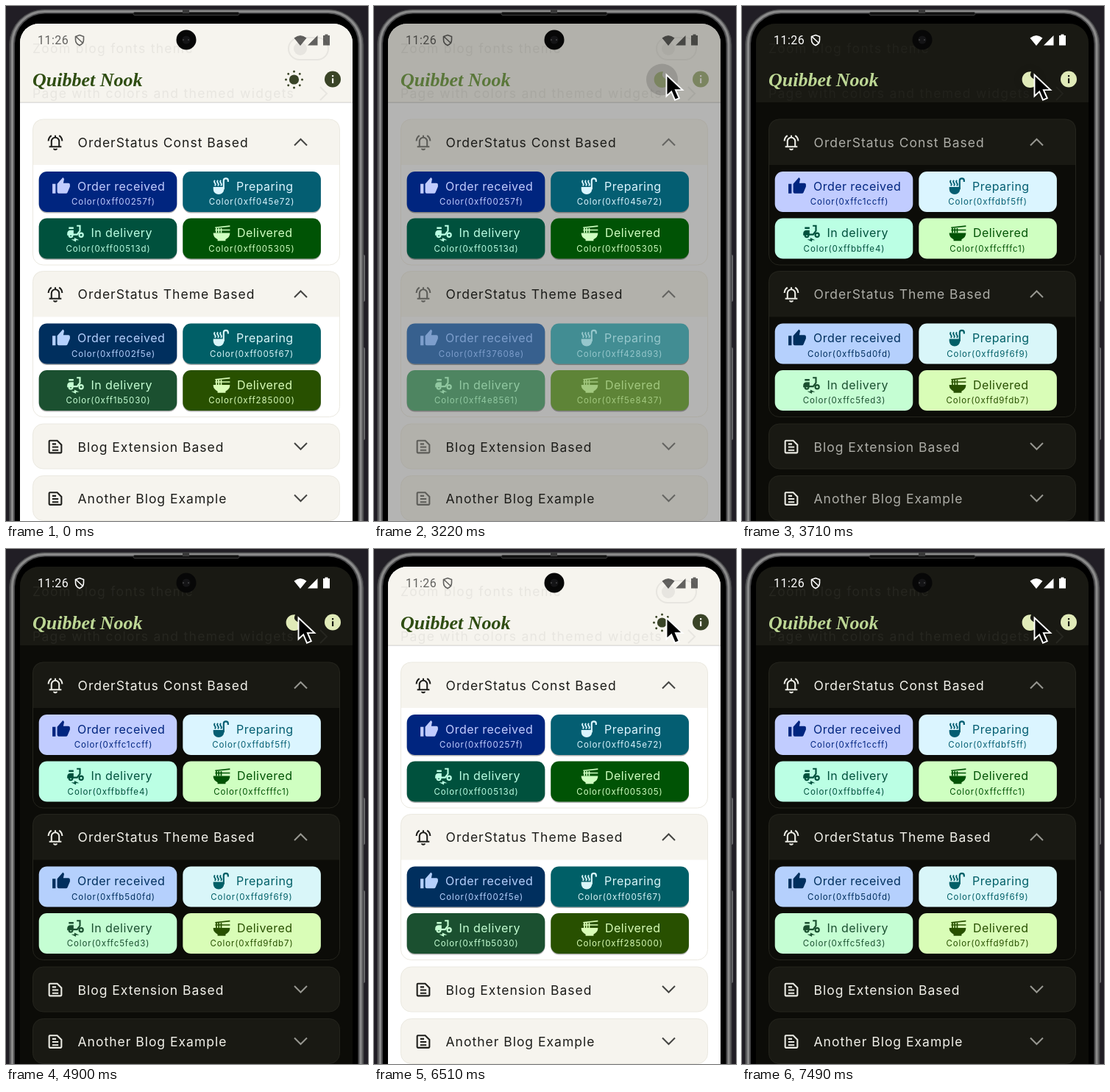
An HTML page that plays this animation: 492 by 700 pixels, repeating every 8000 ms.

```html
<!DOCTYPE html>
<html lang="en">
<head>
<meta charset="utf-8">
<title>Theme switch</title>
<style>
  html, body { margin: 0; width: 100%; height: 100%; overflow: hidden; background: #211e25; }
  svg { display: block; width: 100vw; height: 100vh; }
  text { font-family: Inter, "Open Sans", sans-serif; white-space: pre; }
  .bar { fill: var(--bar); }
  .body { fill: var(--body); }
  .edge { fill: none; stroke: var(--edge); }
  .title { font-size: 17.5px; letter-spacing: 1px; fill: var(--title); }
  .label { font-size: 16px; letter-spacing: .45px; }
  .code { font-size: 11.5px; letter-spacing: .9px; text-anchor: middle; }
  .brand { font: italic bold 26px "Liberation Serif", "Noto Serif", serif; fill: var(--brand); }
  .clock { font: 16px Roboto, sans-serif; letter-spacing: .5px; }
  .status { fill: var(--status); }
  .lead { stroke: var(--lead); }
  .chevron { stroke: var(--chevron); stroke-width: 3; }
  .tool { fill: var(--tool); }
  .line { fill: none; stroke-width: 2; }
  .thin { stroke-width: 1.6; }
  .chip { fill: var(--fg); }
  .chip .line { stroke: var(--fg); }
  .chip .base { fill: var(--bg); }
  .ghost { opacity: .06; }
  .ghost .title { letter-spacing: 1.3px; }
</style>
</head>
<body>
<svg id="stage" viewBox="0 0 492 700" preserveAspectRatio="none"></svg>
<script>
const LOOP = 8000, STEP = 70, FADE = 687;
const TOGGLES = [3010, 4900, 6510];
const stage = document.getElementById('stage');

// light background, dark background; the foreground is the reverse
const CONST = [['00257f', 'c1ccff'], ['045e72', 'dbf5ff'], ['00513d', 'bbffe4'], ['005305', 'cfffc1']];
const THEME = [['002f5e', 'b5d0fd'], ['005f67', 'd9f6f9'], ['1b5030', 'c5fed3'], ['285000', 'd9fdb7']];

const ICONS = {
  thumb: '<path d="M1 21h4V9H1zM7 9v10q0 2 2 2h9q1.4 0 1.9-1.2l3-7q.1-.4.1-.8v-2q0-2-2-2h-6.3l1-5.2L14.2 1z"/>',
  soup: `<path d="M2.5 13H16v2.5a6.5 6.5 0 0 1-13.5 0z"/>
    <path class="line" d="M15.5 16V5a2.8 2.8 0 0 1 5.6 0v1.5"/>
    <path class="line thin" d="M4.5 4.5q-1.6 1.8 0 3.5t0 3.5M8.3 4.5q-1.6 1.8 0 3.5t0 3.5M12 4.5q-1.6 1.8 0 3.5t0 3.5"/>`,
  moped: `<path d="M2 13q0-4.5 4.5-4.5H10V13h4l3-4V4h-3V2h5v7.5L15 15H2zM4 4.5h6v2.5H4zM11 20H7l6 3v-2h4l-6-3z"/>
    <circle class="line" cx="6.5" cy="15" r="2.2"/><circle class="line" cx="19.5" cy="14.5" r="2.4"/>`,
  bowl: `<path d="M1.5 12h21q0 5.5-5.5 8v2H7v-2q-5.5-2.5-5.5-8z"/>
    <path class="line thin" d="M4 5.3 22.5 3.3M4 8.3h18.5M5.5 4.5V12M8.500 4.5V12M11.5 4.5V12"/>`
};
const BELL = 'M7 18v-7a5 5 0 0 1 10 0v7M4 18h16M10.2 20.5a1.8 1.3 0 0 0 3.6 0M12 3v3M3 10.5A9 9 0 0 1 7 3.4M21 10.5A9 9 0 0 0 17 3.4';
const DOC = 'M5 4h9.5L20 9.5V19q0 1-1 1H5q-1 0-1-1V5q0-1 1-1zM8 8.500h5M8 12.5h8M8 16.5h8';

const SLOTS = [
  { icon: 'thumb', text: 'Order received', x: 44.7, y: 0, ix: 62, tx: 97, cx: 146 },
  { icon: 'soup', text: 'Preparing', x: 240.3, y: 0, ix: 279, tx: 313, cx: 334 },
  { icon: 'moped', text: 'In delivery', x: 44.7, y: 63.5, ix: 81, tx: 115.5, cx: 139 },
  { icon: 'bowl', text: 'Delivered', x: 240.3, y: 63.5, ix: 280, tx: 314, cx: 334 }
];

const rect = (x, y, w, h, r, attrs) =>
  `<rect x="${x}" y="${y}" width="${w}" height="${h}" rx="${r}" ${attrs}/>`;
const icon = (x, y, size, inner) =>
  `<g transform="translate(${x} ${y}) scale(${size / 24})">${inner}</g>`;

function chip(s, top) {
  const y = top + s.y;
  return `<g class="chip">
    ${rect(s.x, y + 1.5, 187.6, 55, 11, 'fill="#000" opacity=".3"')}
    ${rect(s.x, y, 187.6, 55, 11, 'class="base"')}
    ${icon(s.ix, y + 7, 26, ICONS[s.icon])}
    <text class="label" x="${s.tx}" y="${y + 25.5}">${s.text}</text>
    <text class="code" x="${s.cx}" y="${y + 45}"></text></g>`;
}

function card(y, name, path, open) {
  const h = open ? 198 : 61;
  const head = open
    ? `<path class="bar" d="M36.5 ${y + 62}v-48q0-14 14-14h389q14 0 14 14v48z"/>`
    : rect(36.5, y, 417, h, 14, 'class="bar"');
  const arrow = open ? `M392 ${y + 35.5}l8.5-8.5 8.5 8.5` : `M392 ${y + 26}l8.5 8.5 8.5-8.5`;
  return `${rect(36.5, y, 417, h, 14, 'class="body"')}${head}
    ${rect(36.5, y, 417, h, 14, 'class="edge"')}
    ${icon(54.5, y + 18.5, 25, `<path class="line lead" d="${path}"/>`)}
    <text class="title" x="97.5" y="${y + 37.5}">${name}</text>
    <path class="line chevron" d="${arrow}"/>
    ${open ? SLOTS.map(s => chip(s, y + 71)).join('') : ''}`;
}

const rays = Array.from({ length: 8 }, (_, i) =>
  `<circle cx="391.5" cy="89" r="1.5" transform="rotate(${i * 45} 391.5 100)"/>`).join('');

const phone = `
  ${rect(0, 0, 492, 700, 0, 'fill="#211e25"')}
  ${rect(482, 338, 6, 64, 2, 'fill="#747476"')}${rect(482, 464, 6, 126, 2, 'fill="#747476"')}
  ${rect(4.5, 4.5, 481.5, 800, 48, 'fill="#5c5c5e" stroke="#38383a"')}
  ${rect(8.5, 7.5, 473.5, 800, 44, 'fill="#4a4a4c" stroke="#8a8a8a" stroke-width="3"')}
  ${rect(12, 10.5, 466.5, 800, 41, 'fill="#000"')}
  ${rect(173, 8.5, 144, 4, 2, 'fill="#111" stroke="#3c3c3c"')}
  ${rect(240, 5, 9, 5, 0, 'fill="#3a3a3a"')}`;

const status = `<g class="status">
  <text class="clock" x="43" y="52">11:26</text>
  <path d="M391.5 43.5q8.5-7 17 0L400 54zM423.5 40v13.5H410z"/>
  <path d="M433.5 40v-1.5h4V40h2.5v13.5h-9V40z"/></g>
  <path class="line thin" stroke="var(--status)" d="M100 39.500l5.5 2v4.5q0 5-5.5 7.5-5.5-2.5-5.5-7.5v-4.5zM95 41.5l10 9.5"/>`;

const bar = `
  ${rect(19, 24, 452, 107, 0, 'class="bar"')}
  ${rect(19, 130.5, 452, 1.5, 0, 'fill="#000" opacity=".12"')}
  <g class="ghost">
    <text class="title" x="36" y="64">Zoom blog fonts theme</text>
    <text class="title" x="36" y="125">Page with colors and themed widgets</text>
    <g id="pill">
      ${rect(384, 43, 54, 30, 15, 'fill="none" stroke="#000" stroke-width="2"')}
      <circle cx="400" cy="58" r="9"/>
    </g>
    <path class="line" stroke="var(--title)" d="M427 110l9 9-9 9"/>
  </g>
  ${status}
  <circle cx="245" cy="46" r="13.5" fill="#070707"/>
  <circle cx="245" cy="46" r="5.5" fill="#141416"/>
  <circle cx="241" cy="46" r="1" fill="#444"/><circle cx="248" cy="46" r="1" fill="#444"/>
  <text class="brand" x="36" y="108.5">Quibbet Nook</text>
  <circle id="ripple" cx="391.5" cy="100" r="21.5"/>
  <g id="sun" class="tool"><circle cx="391.5" cy="100" r="6.6"/>${rays}</g>
  <g id="moon" class="tool">${icon(377, 85.5, 29, '<path d="M12 3a9 9 0 1 0 9 9q0-.7-.1-1.4A5.4 5.4 0 0 1 13.4 3.1Q12.7 3 12 3z"/>')}</g>
  <circle class="tool" cx="444" cy="99.5" r="11"/>
  <path class="bar" d="M443 94h2.2v2.3H443zM443 98.3h2.2v6.7H443z"/>`;

stage.innerHTML = `<defs><clipPath id="screen">${rect(19, 24, 452, 720, 26, '')}</clipPath></defs>
  ${phone}
  <g clip-path="url(#screen)">
    ${rect(19, 24, 452, 676, 0, 'class="body"')}
    ${card(154, 'OrderStatus Const Based', BELL, true)}
    ${card(360.5, 'OrderStatus Theme Based', BELL, true)}
    ${card(568, 'Blog Extension Based', DOC, false)}
    ${card(638.5, 'Another Blog Example', DOC, false)}
    ${bar}
  </g>
  <path id="cursor" d="M0 0v29l6.7-6.2 4.8 11.4 5.8-2.4-4.9-11.200h9.4z" fill="#000" stroke="#fff" stroke-width="1.9"/>`;

const [sun, moon, pill, ripple, cursor] =
  ['sun', 'moon', 'pill', 'ripple', 'cursor'].map(id => document.getElementById(id));
const chips = [...stage.querySelectorAll('.chip')].map((el, i) => ({
  el, code: el.querySelector('.code'), pair: [...CONST, ...THEME][i], fixed: i < 4
}));

const clamp = v => Math.max(0, Math.min(1, v));
function mix(a, b, p) {
  let out = '';
  for (let i = 0; i < 6; i += 2) {
    const u = parseInt(a.slice(i, i + 2), 16), v = parseInt(b.slice(i, i + 2), 16);
    out += Math.floor(u + (v - u) * p).toString(16).padStart(2, '0');
  }
  return out;
}
const show = (el, on) => el.setAttribute('visibility', on ? 'visible' : 'hidden');

function draw(t) {
  const count = TOGGLES.filter(x => x <= t).length;
  const toDark = count % 2 === 1;
  const age = count ? t - TOGGLES[count - 1] : LOOP;
  const level = (delay, length) => {
    const x = clamp((age - delay) / length);
    return toDark ? x : 1 - x;
  };
  const p = level(0, FADE), quick = level(0, 532), late = level(380, 470);

  const set = (name, a, b, k) => stage.style.setProperty('--' + name, '#' + mix(a, b, k));
  set('bar', 'f6f4ee', '191913', p);
  set('body', 'ffffff', '0c0c08', p);
  set('edge', 'ebe9e1', '24241d', p);
  set('brand', '2f4d12', 'bdd795', p);
  set('lead', '1f1f1c', 'ebebe4', p);
  set('tool', '3a4427', 'e0eab8', quick);
  set('chevron', '444442', '979791', quick);
  set('title', '1c1c19', 'f2f1ea', late);
  stage.style.setProperty('--status', level(560, 1) ? '#fff' : 'rgba(0,0,0,.6)');
  pill.setAttribute('opacity', 1 - quick);

  for (const c of chips) {
    const k = c.fixed ? +(p >= 0.5) : p;
    const bg = mix(c.pair[0], c.pair[1], k);
    c.el.style.setProperty('--bg', '#' + bg);
    c.el.style.setProperty('--fg', '#' + mix(c.pair[1], c.pair[0], k));
    c.code.textContent = `Color(0xff${bg})`;
  }

  const night = level(STEP - 1, 1) > 0;
  show(moon, night);
  show(sun, !night);
  ripple.setAttribute('fill', toDark ? '#000' : '#fff');
  ripple.setAttribute('opacity', 0.15 * clamp(Math.min(age / 140, (770 - age) / 200)));
  show(cursor, t >= 2030);
  cursor.setAttribute('transform', `translate(${t < 2100 ? 424 : 397.5} 93.5)`);
}

function tick() {
  const t = performance.now() % LOOP;
  draw(Math.floor(t / STEP) * STEP);
  requestAnimationFrame(tick);
}
tick();
</script>
</body>
</html>
```
